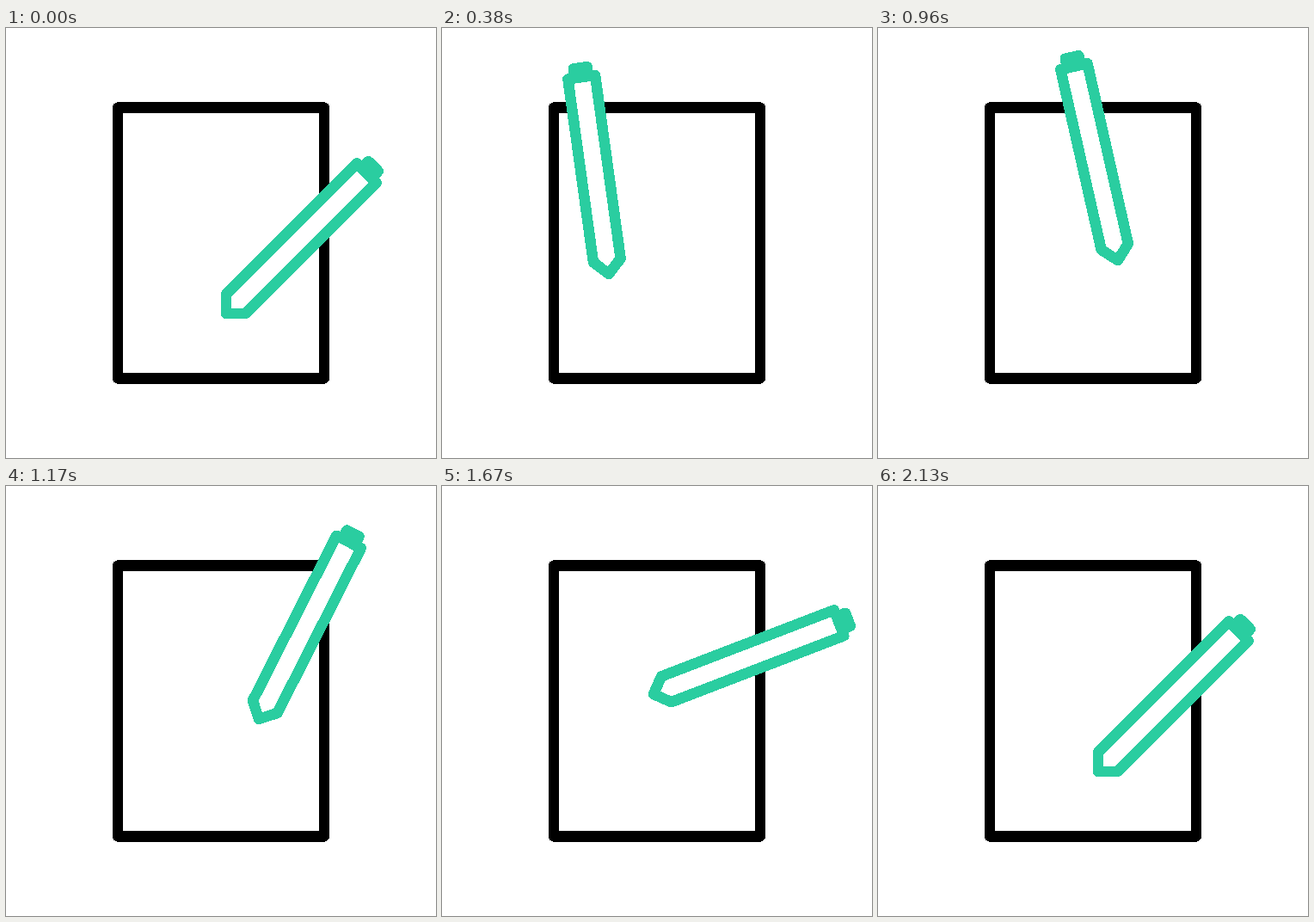
Recreate the animation shown at these times as an HTML page. Size 500 px wide and 500 px high, loop 2.18 s.

```html
<!DOCTYPE html>
<html>
<head>
<meta charset="utf-8">
<style>
html, body { margin: 0; width: 100%; height: 100%; overflow: hidden; background: #fff; }
svg { display: block; width: 100%; height: 100%; fill: #fff; stroke-width: 12.5; stroke-linejoin: round; shape-rendering: crispEdges; }
</style>
</head>
<body>
<svg viewBox="0 0 500 500">
  <rect x="130.2" y="92.5" width="239.6" height="315" stroke="#000"/>
  <g id="pen" stroke="#2acda0">
    <path d="M0 0L-16 -16V-231H16V-16Z"/>
    <path d="M-8 -231V-242H8V-231Z" fill="#2acda0"/>
  </g>
</svg>
<script>
const LOOP = 2180, STEP = 1000 / 24, LAST = 51;
const pen = document.getElementById('pen');

// Key poses of the pen: the curve through them gives all the rest
const pose = (step, x, y, angle) => ({ step, x, y, angle });
const rest = pose(0, 256, 332, 45);
const poses = [
  rest,
  pose(9, 194, 286, -7.9),
  pose(13, 207, 215, -40.5),
  pose(18, 249, 254, -47.8),
  pose(28, 294, 271, 26.9),
  pose(35, 248, 215, 59.7),
  pose(40, 246, 242, 69),
  pose(45, 263.5, 327.5, 51.4),
  { ...rest, step: LAST }
];

// Catmull-Rom tangent, at rest on both ends
function tangent(i, part) {
  const a = poses[i - 1], b = poses[i + 1];
  return a && b ? (b[part] - a[part]) / (b.step - a.step) : 0;
}

function valueAt(step, part) {
  const i = Math.max(1, poses.findIndex(p => p.step >= step));
  const p = poses[i - 1], q = poses[i];
  const span = q.step - p.step, s = (step - p.step) / span, r = 1 - s;
  return r * r * (1 + 2 * s) * p[part] + s * s * (1 + 2 * r) * q[part]
    + span * s * r * (r * tangent(i - 1, part) - s * tangent(i, part));
}

function draw() {
  const t = performance.now() % LOOP;
  const step = Math.min(LAST, Math.floor((t + 4) / STEP));
  const [x, y, angle] = ['x', 'y', 'angle'].map(part => valueAt(step, part));
  pen.setAttribute('transform', `translate(${x} ${y}) rotate(${angle})`);
  requestAnimationFrame(draw);
}
draw();
</script>
</body>
</html>
```
